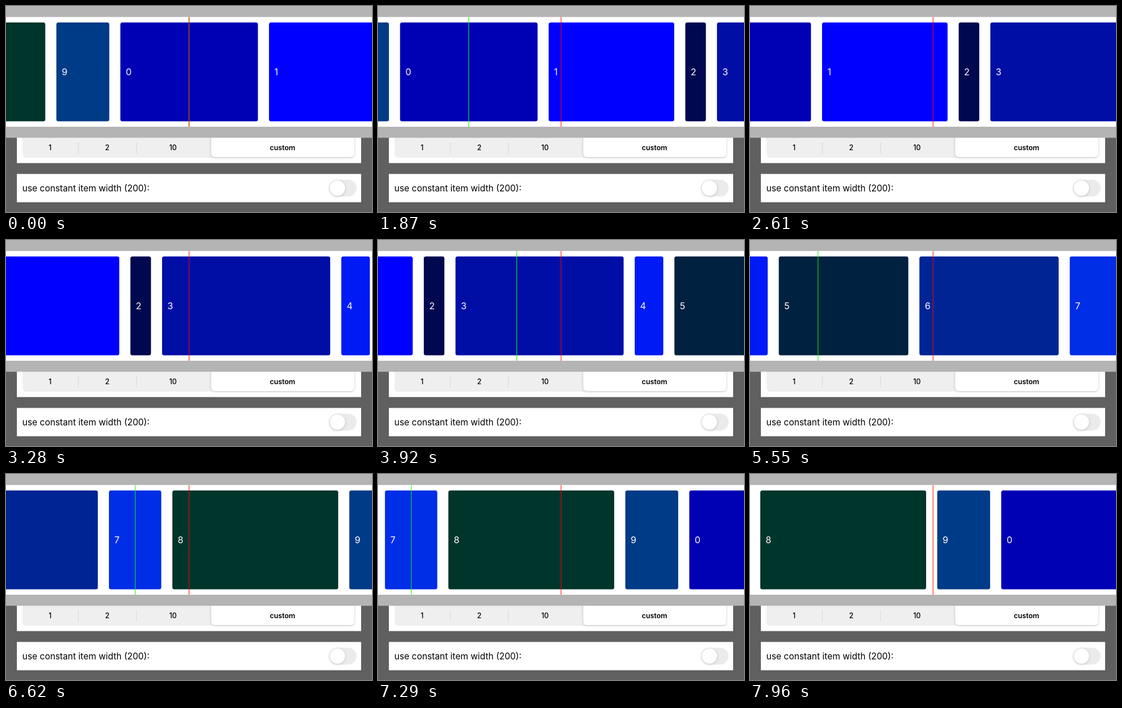
An HTML page for the animation above (8000 ms loop, 640 px wide and 360 px high).

```html
<!DOCTYPE html>
<html lang="en">
<head>
<meta charset="utf-8">
<title>Carousel</title>
<style>
  html, body { margin: 0; width: 100%; height: 100%; overflow: hidden; }
  svg { display: block; width: 640px; height: 360px; }
  text { font-family: Inter, sans-serif; }
  .segment { font-size: 12.4px; font-weight: 500; text-anchor: middle; }
  .card { font-size: 16px; fill: #fff; }
  .knob { filter: drop-shadow(0 1.5px 2px #0003); }
</style>
</head>
<body>
<svg viewBox="0 0 640 360">
  <rect width="640" height="360" fill="#606060"/>
  <path d="M19 220H621V274.5H19zM19 293.5H621V343H19z" fill="#fff"/>

  <rect x="29" y="220" width="580" height="45" rx="6" fill="#efefef"/>
  <path d="M126.3 238V258M228 238V258" stroke="#d6d6d8"/>
  <rect class="knob" x="359" y="220" width="250" height="44" rx="6" fill="#fff"/>
  <g class="segment">
    <text x="77" y="252.4">1</text>
    <text x="177" y="252.4">2</text>
    <text x="292" y="252.4">10</text>
    <text x="483.5" y="252.4" font-weight="600">custom</text>
  </g>

  <text x="28.6" y="324" font-size="15.4">use constant item width (200):</text>
  <rect x="565" y="303.5" width="48" height="29.5" rx="14.75" fill="#ebebec"/>
  <circle class="knob" cx="579.5" cy="318.2" r="13.4" fill="#fff"/>

  <rect width="640" height="230.3" fill="#b4b4b4"/>
  <rect y="19.2" width="640" height="191.8" fill="#fff"/>
  <g id="strip"><rect id="anchor" y="19.2" width="1" height="191.8" fill="#0f0"/></g>
  <rect x="319.6" y="19.2" width="1" height="191.8" fill="#f00"/>
</svg>
<script>
const LOOP = 8000, GAP = 19.4, CENTER = 320, DECAY = 500;
const widths = [240.5, 219.5, 36, 294, 50, 226.5, 243.5, 91.5, 290, 92.5];
const colors = ['#0000b4', '#0000ff', '#00084f', '#000ea6', '#001af5',
                '#00213f', '#002494', '#002de6', '#00352c', '#003b87'];
const strip = document.getElementById('strip');
const anchor = document.getElementById('anchor');

function add(tag, attrs, content = '') {
  const node = document.createElementNS('http://www.w3.org/2000/svg', tag);
  for (const key in attrs) node.setAttribute(key, attrs[key]);
  node.textContent = content;
  strip.insertBefore(node, anchor);
}

// Two cards before the first one and two after the last keep the strip endless.
let left = -(widths[8] + widths[9] + 2 * GAP);
for (let i = -2; i < 12; i++) {
  const n = (i + 10) % 10;
  add('rect', { x: left, y: 28.8, width: widths[n], height: 172.7, rx: 3.5, fill: colors[n] });
  add('text', { class: 'card', x: left + 9.4, y: 121 }, n);
  left += widths[n] + GAP;
}

// Screen updates: first time, last time, count.
const updates = [0];
for (const [from, to, count] of [
  [1240, 1340, 2], [1650, 2400, 8], [2510, 2610, 2], [2850, 3580, 8], [3680, 3820, 2], [3920, 3920, 1],
  [4190, 4950, 8], [5060, 5160, 2], [5440, 6190, 8], [6300, 6620, 4], [6940, 7730, 8], [7850, 7960, 2]
]) {
  for (let k = 0; k < count; k++) {
    updates.push(Math.ceil((from + (to - from) * k / Math.max(1, count - 1)) / 10) * 10);
  }
}

// Each swipe: drag points [time, offset], then a fling that decays towards its target.
const swipes = [
  { drag: [[0, 120], [1140, 120], [1240, 145], [1340, 200]], fling: 1650, target: 389, speed: 167 },
  { drag: [[2410, 352], [2510, 390], [2610, 453.9]], fling: 2850, target: 698, speed: 224 },
  { drag: [[3700, 661.2], [3820, 688], [3920, 738.7]], fling: 4190, target: 1070, speed: 310 },
  { drag: [[4960, 1005.5], [5060, 1045], [5160, 1104]], fling: 5440, target: 1571, speed: 454 },
  { drag: [[6350, 1491.8], [6510, 1535], [6620, 1585.8]], fling: 6940, target: 1895, speed: 279 }
];
// Where the marker was last dropped: time, offset.
const anchors = [[0, 120], [3700, 661.2], [4960, 1005.5], [6350, 1491.8]];

function offsetAt(t) {
  const { drag, fling, target, speed } = swipes.findLast(s => s.drag[0][0] <= t);
  if (t >= fling) return target - speed * Math.exp((fling - t) / DECAY);
  const i = drag.findLastIndex(p => p[0] <= t);
  const [t0, x0] = drag[i], [t1, x1] = drag[i + 1] || [fling, x0];
  return x0 + (x1 - x0) * (t - t0) / (t1 - t0);
}

function draw() {
  const now = performance.now() % LOOP;
  const t = updates.findLast(u => u <= now);
  strip.setAttribute('transform', `translate(${CENTER - offsetAt(t)} 0)`);
  anchor.setAttribute('x', anchors.findLast(a => a[0] <= t)[1] - 0.4);
  requestAnimationFrame(draw);
}
draw();
</script>
</body>
</html>
```
